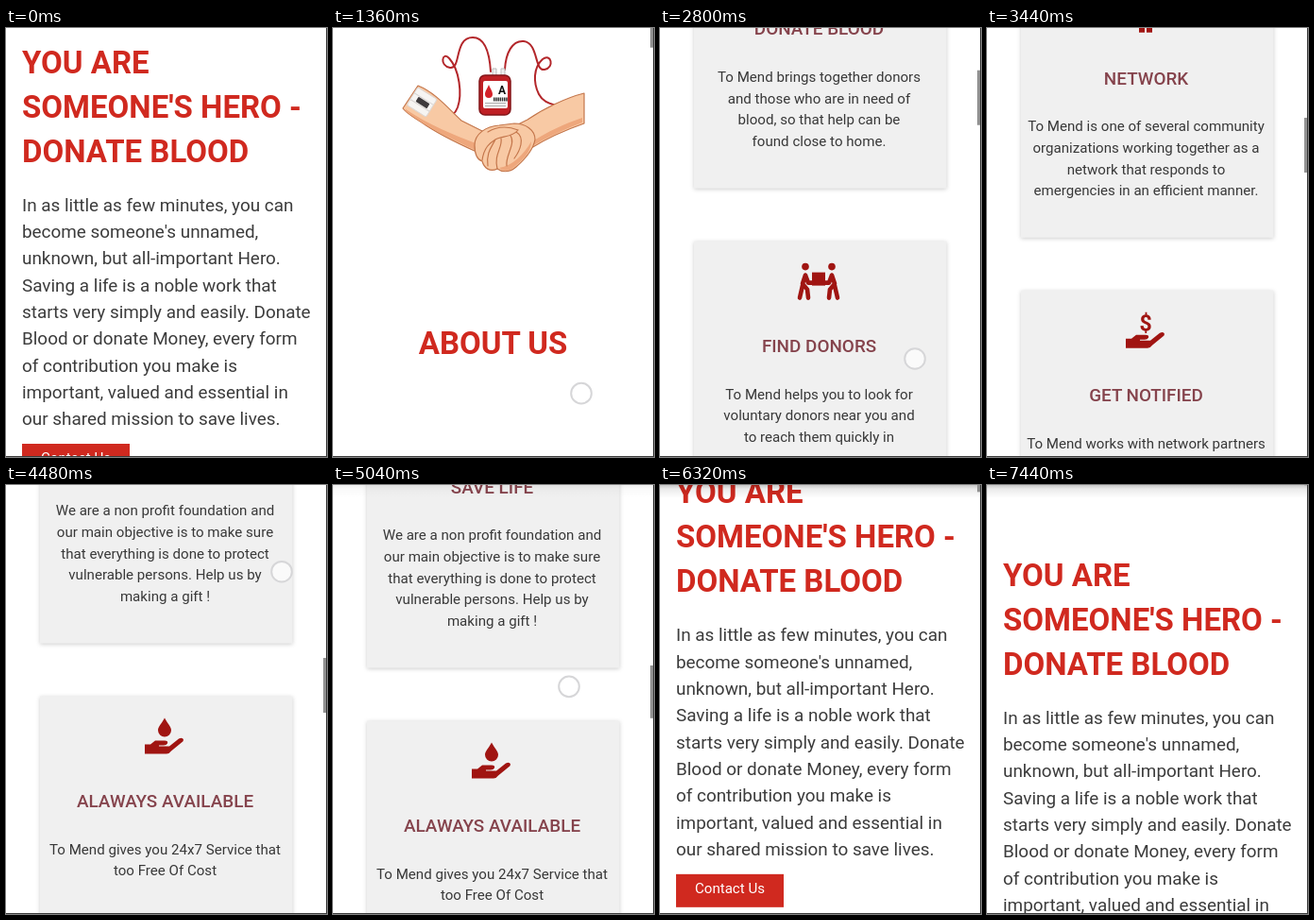
An HTML page for the animation above (7520 ms loop, 340 by 454 pixels).

```html
<!DOCTYPE html>
<html lang="en">
<head>
<meta charset="utf-8">
<title>Blood donation page</title>
<style>
  html, body { margin: 0; width: 100%; height: 100%; overflow: hidden; background: #fff; }
  svg { display: block; width: 100vw; height: 100vh; font-family: Roboto, "Open Sans", sans-serif; }
  .heading { font-size: 33px; font-weight: 700; fill: #d0291f; }
  .copy { font-size: 18.9px; fill: #3c3c3c; }
  .title { font-size: 18.9px; font-weight: 500; fill: #85434c; }
  .small { font-size: 15.1px; fill: #383838; }
  .mid { text-anchor: middle; }
  .card { fill: #f0f0f0; filter: drop-shadow(0 1px 2px rgba(0, 0, 0, .2)); }
  .icon { fill: #a01512; stroke: none; }
  .limb { fill: none; stroke: #a01512; stroke-width: 4.6; stroke-linecap: round; stroke-linejoin: round; }
  .skin { fill: #f8c9a4; stroke: #c4764b; stroke-width: 1.2; stroke-linejoin: round; }
  .crease { fill: none; stroke: #c4764b; stroke-width: 1.2; stroke-linecap: round; }
  .shade { fill: #eea77c; }
  .tube { fill: none; stroke: #b3262a; stroke-width: 2; stroke-linecap: round; }
</style>
</head>
<body>
<svg viewBox="0 0 340 454">
  <defs>
    <linearGradient id="fall" x2="0" y2="1">
      <stop offset="0" stop-color="#000" stop-opacity=".22"/>
      <stop offset=".3" stop-color="#000" stop-opacity=".08"/>
      <stop offset="1" stop-color="#000" stop-opacity="0"/>
    </linearGradient>
    <g id="hand"><path d="M-21 8h6l5-4h10q4 0 3 3q-1 2-4 2h-5v1h11l10-8q4-2 5 1q0 2-2 3l-11 9q-2 3-5 3h-23z"/></g>
    <g id="carrier">
      <circle class="icon" cx="-14" cy="-16" r="3.8"/>
      <path class="limb" d="M-14-7L-17 2L-12 8L-11 17M-17 4L-20 17M-14-7l3 8h5"/>
    </g>
    <g id="dollar" class="icon">
      <use href="#hand"/>
      <text y="-1" font-size="23" font-weight="700" class="mid">$</text>
    </g>
    <g id="drop" class="icon">
      <use href="#hand"/>
      <path d="M0-20C3-14 7-11 7-7A7 7 0 0 1-7-7C-7-11-3-14 0-20z"/>
    </g>
    <g id="carry">
      <rect class="icon" x="-7" y="-10" width="14" height="14"/>
      <use href="#carrier"/>
      <use href="#carrier" transform="scale(-1 1)"/>
    </g>
    <g id="person" class="icon">
      <circle cy="-15" r="4.5"/>
      <path d="M-9-9H9V5H7V19.5H1V8H-1V19.5H-7V5H-9z"/>
    </g>
  </defs>
  <g id="page">
    <g transform="translate(0 550)">
      <path class="tube" d="M167 46C166 30 162 10 148 10C128 10 136 44 124 42C112 40 116 24 123 32C134 44 137 70 132 84C127 97 115 97 104 86"/>
      <path class="tube" d="M182 44C183 26 190 13 202 14C218 16 213 46 224 44C235 42 231 26 222 33C212 42 212 58 218 70C222 78 230 80 236 82"/>
      <path class="skin" d="M90 61C108 68 122 85 136 98L158 109L152 131C132 122 108 110 94 100C84 94 76 88 74 85z"/>
      <path class="shade" d="M77 86C100 102 130 114 151 122L151 129C130 120 100 106 77 88z"/>
      <path class="skin" d="M266 69C246 74 222 86 206 97L190 105L210 127C226 117 246 108 266 101z"/>
      <path class="shade" d="M264 95C246 101 226 110 210 121L211 125C226 116 246 107 264 100z"/>
      <path class="skin" d="M150 124C150 112 162 104 176 103L192 101C204 101 214 108 214 118C212 130 202 140 194 147C186 154 178 152 174 149C166 153 160 148 158 141C152 139 150 131 150 124z"/>
      <path class="shade" d="M176 148C190 146 202 134 210 120C210 132 200 140 192 147C186 152 180 152 176 148z"/>
      <path class="crease" d="M164 110C174 104 186 104 196 108C190 116 178 114 172 118C166 122 160 126 158 140M172 118C168 126 162 132 164 146M178 117C180 126 170 134 174 149M188 114C194 122 182 136 184 146M194 110C204 116 198 130 192 138"/>
      <g transform="translate(95 79) rotate(32)">
        <rect x="-13" y="-11" width="24" height="22" rx="2" fill="#f6f4f2" stroke="#ddd8d4"/>
        <path d="M-13-4H11M-13 4H11" stroke="#d8d4d2"/>
        <rect x="-7" y="-3" width="14" height="6" rx="1" fill="#3e3a3c"/>
      </g>
      <path d="M169 52v-9h4v9M178 52v-9h4v9" fill="#eee" stroke="#bbb"/>
      <rect x="155" y="50" width="33" height="42" rx="6" fill="#bf2025" stroke="#841519" stroke-width="1.5"/>
      <rect x="159" y="56" width="26" height="29" rx="2" fill="#fff"/>
      <path d="M165 60C167 65 169 67 169 70A4 4 0 0 1 161 70C161 67 163 65 165 60z" fill="#d4222a"/>
      <text x="179" y="70" font-size="12" font-weight="700" class="mid" fill="#111">A</text>
      <path d="M170 75.5H185" stroke="#333" stroke-width="4" stroke-dasharray="1.5 .7"/>
      <path d="M161 79.5H183M161 82.5H183" stroke="#aaa"/>
    </g>
  </g>
  <rect id="shadow" width="340" height="14" fill="url(#fall)"/>
  <rect id="thumb" x="336" width="4" fill="#929292"/>
  <path d="M339.5 0V454M0 453.5H340" stroke="#3a3a3a" fill="none"/>
  <circle id="touch" r="10.8" fill="#fff" fill-opacity=".65" stroke="#d6d6d8" stroke-width="2"/>
</svg>
<script>
const LOOP = 7520, STEP = 80;
const byId = id => document.getElementById(id);
const page = byId('page'), shadow = byId('shadow'), thumb = byId('thumb'), touch = byId('touch');

function add(parentNode, tag, attrs, content = '') {
  const node = document.createElementNS('http://www.w3.org/2000/svg', tag);
  for (const key in attrs) node.setAttribute(key, attrs[key]);
  node.textContent = content;
  parentNode.append(node);
  return node;
}

function lines(cls, x, y, pitch, text) {
  const group = add(page, 'g', { class: cls });
  text.split('|').forEach((line, i) => add(group, 'text', { x, y: y + i * pitch }, line));
  return group;
}

lines('heading', 17, 47.5, 47, "YOU ARE|SOMEONE'S HERO -|DONATE BLOOD");
lines('copy', 17, 193.5, 28.35, "In as little as few minutes, you can|become someone's unnamed,|" +
  'unknown, but all-important Hero.|Saving a life is a noble work that|starts very simply and easily. Donate|' +
  'Blood or donate Money, every form|of contribution you make is|important, valued and essential in|' +
  'our shared mission to save lives.');
add(page, 'rect', { x: 17, y: 440, width: 114, height: 35, fill: '#d0291f' });
add(page, 'text', { x: 74, y: 460, class: 'small mid', style: 'fill:#fff' }, 'Contact Us');
lines('heading mid', 169.5, 894.7, 0, 'ABOUT US');
const about = lines('copy', 19, 961, 28.35, '"To Mend" is an organization that|brings voluntary blood donors and|' +
  'those in need of blood on to a|common platform. Through this|website, we seek donors who are|' +
  'willing to donate blood, as well as|provide the timeliest support to|those in frantic need of it.');
lines('heading mid', 170, 1381.7, 0, 'OUR SERVICES');

const cards = [
  ['drop', 'DONATE BLOOD', 'To Mend brings together donors|and those who are in need of|blood, so that help can be|found close to home.'],
  ['carry', 'FIND DONORS', 'To Mend helps you to look for|voluntary donors near you and|to reach them quickly in|any emergency.'],
  ['person', 'NETWORK', 'To Mend is one of several community|organizations working together as a|network that responds to|emergencies in an efficient manner.'],
  ['dollar', 'GET NOTIFIED', 'To Mend works with network partners|to let you know when blood is|needed, so that you can|respond in time.'],
  ['drop', 'FREE OF COST', "To Mend's ultimate goal is to provide|an easy-to-use, easy-to-access, fast,|efficient, and reliable way to get life-|saving blood, totally Free of cost."],
  ['carry', 'SAVE LIFE', 'We are a non profit foundation and|our main objective is to make sure|that everything is done to protect|vulnerable persons. Help us by|making a gift !'],
  ['drop', 'ALAWAYS AVAILABLE', 'To Mend gives you 24x7 Service that|too Free Of Cost']
];
let cardY = 1450;
for (const [icon, title, text] of cards) {
  const height = 211.5 + (text.split('|').length - 1) * 22.7;
  add(page, 'rect', { class: 'card', x: 36, y: cardY, width: 267.5, height });
  add(page, 'use', { href: '#' + icon, transform: `translate(168 ${cardY + 43})` });
  lines('title mid', 168.5, cardY + 117.3, 0, title);
  lines('small mid', 168.5, cardY + 167, 22.7, text);
  cardY += height + 56;
}

// Flicks: start, end, scroll position reached.
const flicks = [
  [840, 1340, 550], [1360, 2100, 939], [2160, 2760, 1560], [2800, 3440, 2179],
  [3480, 4060, 2720], [4080, 4290, 3040], [4300, 4860, 3364],
  [4960, 5440, 3062], [5583, 6641, -59]
];
// Touches: start, end, x, first y, last y.
const touches = [
  [830, 1000, 262, 400, 150], [1350, 1530, 263, 400, 160], [2150, 2350, 262, 355, 115],
  [2800, 2980, 270, 350, 120], [3480, 3660, 275, 340, 110], [4080, 4220, 285, 330, 110],
  [4290, 4490, 292, 314, 80], [4960, 5140, 250, 120, 330], [5500, 5620, 240, 150, 240]
];
const progress = (t, a, b) => Math.min(1, Math.max(0, (t - a) / (b - a)));

function scrollAt(t) {
  let pos = 0;
  for (const [start, end, to] of flicks) {
    pos += (to - pos) * (1 - (1 - progress(t, start, end)) ** 3);
  }
  return pos;
}

function render(t) {
  const scroll = scrollAt(t);
  const bar = progress(t, 4980, 5200);
  page.setAttribute('transform', `translate(0 ${-scroll})`);
  about.setAttribute('opacity', progress(t, 1440, 1760));
  shadow.setAttribute('opacity', bar);
  thumb.setAttribute('y', 95 + (scroll - 2179) * 0.0812 + 37 * bar);
  thumb.setAttribute('height', 58 - 8 * bar);
  const active = touches.find(([start, end]) => t >= start && t <= end);
  touch.setAttribute('visibility', active ? 'visible' : 'hidden');
  if (active) {
    const [start, end, x, y0, y1] = active;
    touch.setAttribute('cx', x);
    touch.setAttribute('cy', y0 + (y1 - y0) * progress(t, start, end));
  }
}

const begin = performance.now();
function tick() {
  const t = (performance.now() - begin) % LOOP;
  render(Math.floor(t / STEP) * STEP);
  requestAnimationFrame(tick);
}
tick();
</script>
</body>
</html>
```
